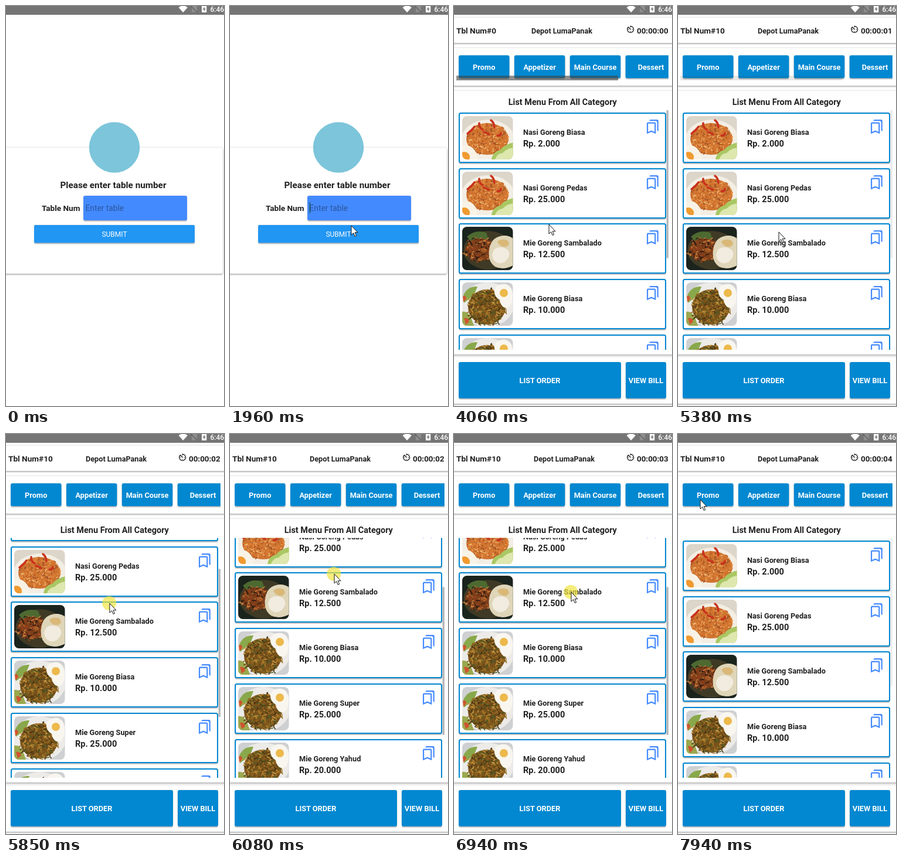
An HTML page that plays this animation: 372x683 px, repeating every 8 s.

```html
<!DOCTYPE html>
<html lang="id">
<head>
<meta charset="utf-8">
<title>Table ordering</title>
<style>
html, body { margin: 0; width: 100%; height: 100%; overflow: hidden; background: #fff; }
svg { display: block; width: 372px; height: 683px; }
text { font-family: Roboto, sans-serif; font-weight: 700; fill: #212121; }
.mid { text-anchor: middle; }
.raised { filter: drop-shadow(0 2px .7px rgba(0,0,0,.2)) drop-shadow(0 .5px 1.3px rgba(0,0,0,.16)); }
.panel { fill: #fff; filter: drop-shadow(0 2px .8px rgba(0,0,0,.22)) drop-shadow(0 .5px 1.4px rgba(0,0,0,.2)); }
.blue { fill: #0288d1; }
.white { fill: #fff; }
</style>
</head>
<body>
<svg viewBox="0 0 372 683" xmlns="http://www.w3.org/2000/svg">
  <defs>
    <clipPath id="photoClip"><rect width="86.5" height="74" rx="8"/></clipPath>
    <clipPath id="listClip"><rect y="177.5" width="372" height="409.5"/></clipPath>
    <clipPath id="chipClip"><rect y="74" width="366" height="60"/></clipPath>
    <path id="bookmarks" fill="#448aff" transform="scale(1.1)" d="M15 7v12.97l-5-2.15-5 2.15V7h10m4-6H8.99C7.89 1 7 1.9 7 3h10c1.1 0 2 .9 2 2v13l2 1V3c0-1.1-.9-2-2-2zm-4 4H5c-1.1 0-2 .9-2 2v16l7-3 7 3V7c0-1.1-.9-2-2-2z"/>
    <g id="rice" clip-path="url(#photoClip)">
      <rect width="87" height="74" fill="#dcd5c9"/>
      <ellipse cx="44" cy="42" rx="46" ry="36" fill="#f3eee4"/>
      <ellipse cx="43" cy="39" rx="36" ry="27" fill="#cf7430"/>
      <g id="riceStrands"></g>
      <path d="M49 7q5 3 6 12M9 30q7-5 12-12M29 12q-1 7 6 11M60 33q5 2 6-4M37 27l9 4" fill="none" stroke="#c9301d" stroke-width="3.5" stroke-linecap="round"/>
      <path d="M50 74q2-14 15-16 5-9 22-13v29z" fill="#a9c763"/>
      <path d="M56 74q3-10 13-11 7-8 18-9v20z" fill="#dde7ae"/>
      <path d="M0 51q13-4 21 7 6 7 5 16H0z" fill="#f8f3e6"/>
      <circle cx="4" cy="70" r="9" fill="#f09a31"/>
    </g>
    <g id="sambal" clip-path="url(#photoClip)">
      <rect width="87" height="74" fill="#1b231d"/>
      <ellipse cx="44" cy="40" rx="42" ry="33" fill="#3f3a25"/>
      <path d="M8 17q14-13 33-7l4 12-29 4z" fill="#4d6a31"/>
      <ellipse cx="31" cy="39" rx="26" ry="19" fill="#7d3f1b"/>
      <g id="sambalStrands"></g>
      <path d="M46 40q2-20 19-24 12-3 22 4v46q-17 9-31 2-13-9-10-28z" fill="#dfd5b8"/>
      <path d="M51 48q2-14 16-13 15 2 13 15-6 14-18 12-10-3-11-14z" fill="#f1ecdf"/>
      <path d="M60 25q8-6 17-2 6 6-1 11-12 2-16-9z" fill="#d9b878"/>
    </g>
    <g id="noodle" clip-path="url(#photoClip)">
      <rect width="87" height="74" fill="#cfd0d2"/>
      <ellipse cx="43" cy="38" rx="45" ry="38" fill="#ecebe8"/>
      <path d="M2 22q7-16 24-15l-6 15L3 35z" fill="#89a84b"/>
      <path d="M0 50q9-2 15 10l5 14H0z" fill="#9aa94f"/>
      <path d="M1 24q5-3 6 4l-5 6zM3 61q7-2 9 6l-6 5z" fill="#d0532f"/>
      <ellipse cx="42" cy="42" rx="32" ry="30" fill="#79521b"/>
      <g id="noodleStrands"></g>
      <path d="M55 13q4-12 19-10 13 4 12 21-1 18-11 20-10-3-11-14-10-6-9-17z" fill="#f8f6ef"/>
      <circle cx="71" cy="18" r="7" fill="#edb94b"/>
    </g>
  </defs>

  <rect width="372" height="683" fill="#fff"/>
  <g id="login">
    <rect class="panel" x="-4" y="242" width="374" height="215" rx="3"/>
    <circle cx="185" cy="241.5" r="43.2" fill="#7cc5da"/>
    <text class="mid" x="183" y="311" font-size="15.3">Please enter table number</text>
    <text x="61" y="350.3" font-size="13.57">Table Num</text>
    <rect class="raised" x="132" y="324" width="177" height="42" rx="3" fill="#448aff"/>
    <text id="field" x="135.5" y="350" font-size="13.75" style="font-weight:400"></text>
    <rect id="caret" y="335" width="1.5" height="19" fill="#1d5b62"/>
    <rect id="submit" class="raised" x="48" y="374" width="274" height="30.5" rx="2"/>
    <text class="mid" x="185" y="394.2" font-size="12" style="font-weight:400;fill:#fff">SUBMIT</text>
  </g>

  <g id="menu">
    <rect y="15" width="372" height="668" fill="#fff"/>
    <rect class="panel" x="-4" y="20" width="380" height="43"/>
    <rect class="panel" x="-4" y="72" width="380" height="64"/>
    <rect class="panel" x="-4" y="145" width="380" height="450"/>
    <rect class="panel" x="-4" y="600" width="380" height="79"/>
    <text id="table" x="4" y="47" font-size="13.6"></text>
    <text id="shop" class="mid" y="46.8" font-size="12.67">Depot LumaPanak</text>
    <path fill="#212121" transform="translate(293 31.8) scale(.68)" d="M11 17a1 1 0 1 0 2 0 1 1 0 1 0-2 0zm0-14v4h2V5.08c3.39.49 6 3.39 6 6.92a7 7 0 1 1-14 0c0-1.68.59-3.22 1.58-4.42L12 13l1.41-1.41-6.8-6.8C4.42 6.45 3 9.05 3 12a9 9 0 1 0 9-9zm7 9a1 1 0 1 0-2 0 1 1 0 1 0 2 0zM6 12a1 1 0 1 0 2 0 1 1 0 1 0-2 0z"/>
    <text id="timer" x="312" y="47" font-size="13.4"></text>
    <g id="chips" clip-path="url(#chipClip)"></g>
    <rect id="barX" x="4" y="119" width="276" height="8" fill="#444"/>
    <text class="mid" x="185.3" y="168.7" font-size="14.48">List Menu From All Category</text>
    <g clip-path="url(#listClip)"><g id="list"></g></g>
    <rect id="barY" x="362.6" width="3.4" height="252.5" fill="#74747c"/>
    <g id="footer"></g>
  </g>

  <rect width="372" height="15" fill="#757575"/>
  <path class="white" d="M294.5 2.5q7.7-6 15.4 0L302.2 11z"/>
  <path d="M319 0h7v10.5h-9V2z" fill="#8e8e8e"/>
  <path d="M315.5 0l11 11" stroke="#5f5f5f" stroke-width="1.3"/>
  <rect class="white" x="334" y="-1" width="8.3" height="12" rx="1"/>
  <path d="M339 1l-3.3 5h2v3.5l3-5h-2z" fill="#757575"/>
  <text x="348.5" y="9.8" font-size="12" style="font-weight:500;fill:#fff">6:46</text>

  <g id="pointer">
    <circle id="press" cx="-.8" cy="-.3" r="12" fill="#f0e53c" opacity=".68"/>
    <path d="M0 0V16L3.7 12.6 6.2 18.5 8.6 17.4 6.2 11.7H11Z" fill="#fff" stroke="#111"/>
  </g>
</svg>

<script>
const $ = id => document.getElementById(id);

// Short random strokes that give the food its texture
function strands(id, seed, count, length, [cx, cy, rx, ry], colors) {
  const rnd = () => (seed = seed * 16807 % 2147483647) / 2147483647;
  let out = '';
  for (let i = 0; i < count; i++) {
    const a = rnd() * 6.283, r = Math.sqrt(rnd());
    const x = cx + rx * r * Math.cos(a), y = cy + ry * r * Math.sin(a);
    const d = [1, .8, 1, .8].map(s => ((rnd() - .5) * s * length).toFixed(1));
    out += `<path d="M${x.toFixed(1)} ${y.toFixed(1)}q${d}" stroke="${colors[i % colors.length]}"/>`;
  }
  $(id).innerHTML = `<g fill="none" stroke-width="1.5" stroke-linecap="round">${out}</g>`;
}
strands('riceStrands', 7193, 260, 5, [43, 39, 37, 28],
  ['#e79a52', '#ad4f1c', '#f0b873', '#d8742c', '#e48a3c', '#94502a']);
strands('sambalStrands', 2917, 150, 8, [31, 39, 28, 21],
  ['#b5662a', '#4a2110', '#96401b', '#c58342', '#2b1b10']);
strands('noodleStrands', 5381, 230, 13, [42, 42, 33, 31],
  ['#a97b2b', '#46300f', '#c29440', '#5e4016', '#93671f', '#4d5a26']);

const button = (x, y, w, h, label) =>
  `<rect class="raised blue" x="${x}" y="${y}" width="${w}" height="${h}" rx="3"/>
   <text class="mid" x="${x + w / 2}" y="${y + h / 2 + 4.7}" font-size="12.8" style="fill:#fff">${label}</text>`;

$('chips').innerHTML = ['Promo', 'Appetizer', 'Main Course', 'Dessert']
  .map((label, i) => button(8 + i * 94.9, 84.3, 86.5, 39, label)).join('');
$('footer').innerHTML = button(8, 608, 277, 62, 'LIST ORDER') + button(293, 608, 69, 62, 'VIEW BILL');

$('list').innerHTML = [
  ['Nasi Goreng Biasa', '2.000', 'rice'],
  ['Nasi Goreng Pedas', '25.000', 'rice'],
  ['Mie Goreng Sambalado', '12.500', 'sambal'],
  ['Mie Goreng Biasa', '10.000', 'noodle'],
  ['Mie Goreng Super', '25.000', 'noodle'],
  ['Mie Goreng Yahud', '20.000', 'noodle']
].map(([name, price, photo], i) => `<g transform="translate(0 ${Math.round(181.8 + i * 94.75)})">
  <rect class="raised" x="9" y="1" width="352" height="84" rx="2.5" fill="#fff" stroke="#0288d1" stroke-width="2"/>
  <use href="#${photo}" x="14" y="6"/>
  <text x="118" y="38.2" font-size="12.75">${name}</text>
  <text x="118" y="57.5" font-size="14.55">Rp. ${price}</text>
  <use href="#bookmarks" x="325.7" y="11"/></g>`).join('');

// Pointer path: [ms, x, y]
const path = [
  [180, 275, 598], [340, 207, 407], [490, 207, 407], [800, 196, 350], [1260, 196, 350],
  [1410, 207, 375], [2590, 207, 375], [2890, 203, 394], [3090, 203, 394], [3370, 176, 308],
  [3680, 176, 308], [4040, 162, 373], [4300, 162, 373], [4680, 98, 352], [4990, 98, 352],
  [5370, 172, 386], [5540, 175, 374], [6070, 178, 239], [6180, 178, 239], [6310, 186, 166],
  [6460, 190, 200], [6690, 190, 200], [6900, 200, 270], [6950, 200, 270], [7460, 225, 500],
  [7550, 225, 500], [7930, 38, 112]
];
const clamp = v => Math.min(1, Math.max(0, v));
const ramp = (t, a, b) => clamp((t - a) / (b - a));
const within = (t, ...spans) => spans.some(([a, b]) => t >= a && t < b);
const set = (id, name, value) => $(id).setAttribute(name, value);
const show = (id, on) => set(id, 'visibility', on ? 'inherit' : 'hidden');

function pointerAt(t) {
  const i = path.findIndex(p => p[0] > t);
  if (i === 0) return path[0].slice(1);
  if (i < 0) return path[path.length - 1].slice(1);
  const [a, x0, y0] = path[i - 1], [b, x1, y1] = path[i];
  const k = ramp(t, a, b), e = k * k * (3 - 2 * k);
  return [x0 + (x1 - x0) * e, y0 + (y1 - y0) * e];
}

// The list follows the pointer while it drags
function scrollAt(t, y) {
  if (t < 5540) return 0;
  if (t < 6070) return 374 - y;
  if (t < 6950) return 135;
  return t < 7460 ? Math.max(0, 405 - y) : 0;
}

function draw(t) {
  const [x, y] = pointerAt(t);
  show('pointer', t >= 180);
  set('pointer', 'transform', `translate(${x} ${y})`);
  show('press', within(t, [800, 960], [3060, 3200], [5540, 6150], [6880, 7460]));

  const typed = t >= 2130;
  $('field').textContent = typed ? '10' : 'Enter table';
  $('field').style.fill = typed ? '#212121' : '#2b579d';
  set('caret', 'x', typed ? 151 : 135.5);
  show('caret', within(t, [900, 1410], [1960, 2600], [2890, 3060]));
  set('submit', 'fill', within(t, [3060, 3300]) ? '#1e88df' : '#2196f3');

  const enter = 1 - Math.pow(1 - ramp(t, 3680, 3980), 3);
  show('menu', t >= 3680);
  set('menu', 'opacity', enter);
  set('menu', 'transform', `translate(0 ${36 * (1 - enter)})`);

  const known = t >= 4990;
  $('table').textContent = known ? 'Tbl Num#10' : 'Tbl Num#0';
  set('shop', 'x', known ? 188 : 184);
  $('timer').textContent = '00:00:0' + [4680, 5680, 6690, 7690].filter(s => t >= s).length;

  const scroll = Math.round(scrollAt(t, y));
  set('list', 'transform', `translate(0 ${-scroll})`);
  set('barY', 'y', 178 + scroll * .617);
  const fade = t < 5540 ? ramp(t, 5000, 5400) : ramp(t, 7550, 7940);
  set('barY', 'opacity', .52 * (1 - .75 * fade));
  set('barX', 'opacity', .6 * (1 - ramp(t, 5000, 5480)));
}

const start = performance.now();
function tick() {
  draw((performance.now() - start) % 8000);
  requestAnimationFrame(tick);
}
tick();
</script>
</body>
</html>
```
